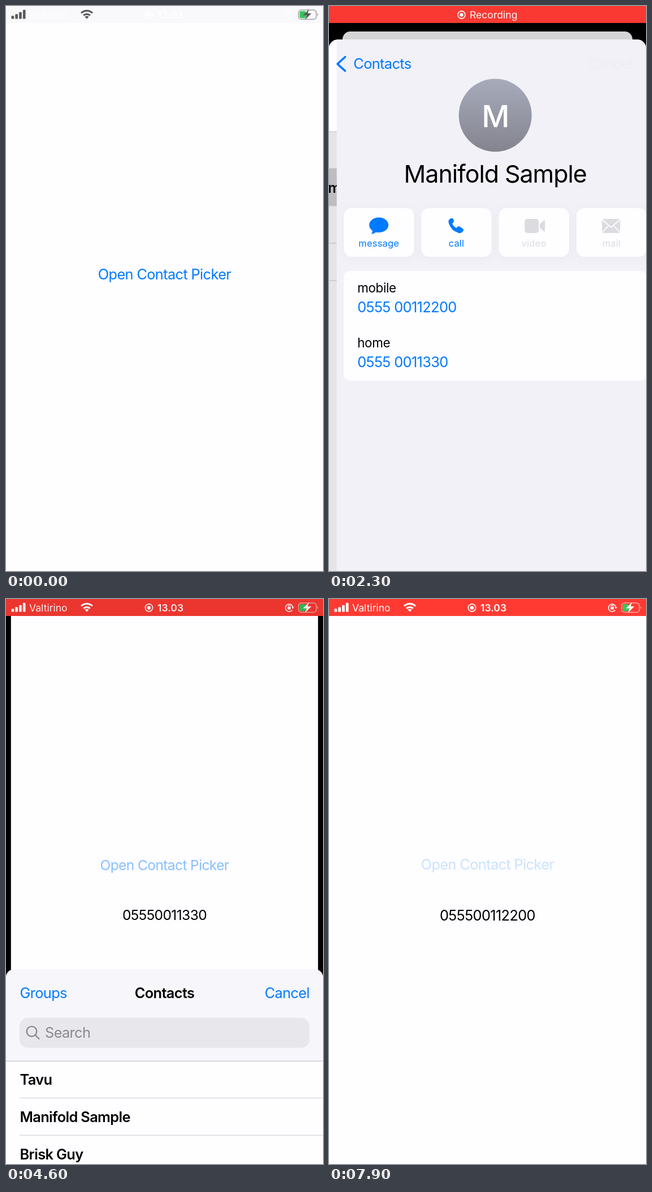
An HTML page for the animation above (8 s loop, 561 by 998 pixels).

```html
<!DOCTYPE html>
<html lang="en">
<head>
<meta charset="utf-8">
<title>Contact picker</title>
<style>
  html, body { margin: 0; width: 100%; height: 100%; overflow: hidden; background: #000; }
  svg { display: block; width: 100%; height: 100%; }
  text { font: 25.4px Inter, "Open Sans", sans-serif; letter-spacing: -.026em; white-space: pre; }
  .blue { fill: #007aff; }
  .off { fill: #dcdbe0; }
  .mid { text-anchor: middle; }
  .bold { font-weight: 600; }
  .grey { fill: #8a898e; }
  .italic { font-style: italic; }
  .bar text { font-size: 17.6px; letter-spacing: 0; fill: #fff; }
  text.small { font-size: 16.5px; letter-spacing: .01em; }
  text.kind { font-size: 22.4px; letter-spacing: -.015em; }
  text.name { font-size: 43px; letter-spacing: -.025em; }
  text.initial { font-size: 54px; font-weight: 500; fill: #fff; }
  #tiles rect { filter: drop-shadow(0 2px 8px rgba(0, 0, 0, .03)); }
</style>
</head>
<body>
<svg viewBox="0 0 561 998" preserveAspectRatio="none">
  <defs>
    <linearGradient id="shade" x2="0" y2="1">
      <stop stop-color="#a7abbb"/><stop offset="1" stop-color="#84848f"/>
    </linearGradient>
    <clipPath id="sheetClip"><rect y="59.6" width="561" height="1100" rx="15"/></clipPath>
    <clipPath id="cardClip"><rect x="12" y="468" width="537" height="194" rx="12"/></clipPath>
    <g id="record">
      <circle r="6.6" fill="none" stroke="#fff" stroke-width="1.7"/><circle r="3.3" fill="#fff"/>
    </g>
  </defs>

  <rect width="561" height="998"/>

  <g id="home">
    <rect id="homeBg" width="561" height="998" fill="#fefdff"/>
    <text id="open" class="blue mid" x="280.5">Open Contact Picker</text>
    <text id="picked" class="mid" x="280.5" y="568"></text>
    <rect id="homeDim" width="561" height="998"/>
  </g>

  <g id="sheet"><g clip-path="url(#sheetClip)">
    <rect y="59" width="561" height="1100" fill="#fefdff"/>
    <g id="list">
      <rect id="rowMark" y="287" width="800" height="66" fill="#d1d1d6"/>
      <g id="rows"></g>
    </g>
    <rect id="listDim" y="222" width="561" height="900"/>
    <rect y="59" width="561" height="163" fill="#fefdff"/>
    <rect id="headTint" y="59" width="561" height="163" fill="#f7f6fa"/>
    <rect y="221.3" width="561" height="1.5" fill="#cfced2"/>
    <g id="search">
      <rect x="24" y="145.5" width="513" height="53" rx="15" fill="#e8e7eb"/>
      <g fill="none" stroke="#85848a" stroke-width="2.2" stroke-linecap="round">
        <circle cx="45.5" cy="169.5" r="8.8"/><path d="M52 176l6.5 6.5"/>
      </g>
      <text class="grey" x="69" y="180.5">Search</text>
    </g>

    <g id="detail">
      <rect y="59" width="561" height="1100" fill="#f2f1f7"/>
      <g id="content">
        <circle cx="280.5" cy="193" r="64.5" fill="url(#shade)"/>
        <text class="initial mid" x="280.5" y="214">M</text>
        <text class="name mid" x="280.5" y="312">Manifold Sample</text>
        <g id="tiles"></g>
        <path class="blue" d="M74.5 373.5c9.5 0 17 6 17 13.3s-7.5 13.3-17 13.3q-3 0-5-.6q-3.5 3.2-8.5 3q2.5-2.5 2.3-5.5q-5.8-4-5.8-10.2c0-7.3 7.5-13.3 17-13.3z"/>
        <path class="blue" d="M202.5 375q-6 2-4.5 8q4 14 18 18q6 1 8.5-5q0-2-2-3l-5-3.5q-2-1-3.5 .5l-2.5 2q-5-2.5-7-7.5l2-2.5q1.5-2 .5-4q-1.5-4-4.5-3z"/>
        <g class="off">
          <rect x="332.5" y="376" width="25" height="25" rx="5"/>
          <path d="M359.5 385l7-6q2-1 2 1v17q0 2-2 1l-7-6z"/>
          <rect x="469.5" y="376" width="32" height="25" rx="2.5"/>
          <path d="M469.5 377l16 14l16-14M469.5 400l11.5-12M501.5 400l-11.5-12" fill="none" stroke="#fefdff" stroke-width="1.8"/>
        </g>
        <g clip-path="url(#cardClip)">
          <rect x="12" y="468" width="537" height="194" fill="#fefdff"/>
          <rect id="cellMark" x="12" width="537" height="97" fill="#d2d1d6"/>
        </g>
        <g id="numbers"></g>
      </g>
    </g>

    <g id="nav">
      <g id="listNav">
        <text class="blue" x="24.5" y="111">Groups</text>
        <text class="blue" x="537" y="111" text-anchor="end">Cancel</text>
        <text id="title" class="bold mid" y="111">Contacts</text>
      </g>
      <g id="backNav">
        <path d="M28.5 90l-13.5 12.3l13.5 12.3" fill="none" stroke="#007aff" stroke-width="3.6" stroke-linecap="round" stroke-linejoin="round"/>
        <text id="back" class="blue mid" y="111">Contacts</text>
      </g>
    </g>
  </g></g>

  <g class="bar">
    <rect width="561" height="30" fill="#f9f8fa"/>
    <rect id="red" width="561" height="30" fill="#ff3a33"/>
    <g id="status">
      <g id="icons" fill="currentColor">
        <g id="signal"></g>
        <path d="M143 22.8l-3.6-3.7a5.2 5.2 0 0 1 7.2 0z"/>
        <path d="M137.2 16.7a8.3 8.3 0 0 1 11.6 0M133 12.5a14 14 0 0 1 20 0" fill="none" stroke="currentColor" stroke-width="3.2"/>
        <rect x="517.7" y="7" width="31.5" height="16.5" rx="5" fill="none" stroke="currentColor" stroke-opacity=".55" stroke-width="1.5"/>
        <path d="M551 12.5q2.6 2.7 0 5.5z" fill-opacity=".6"/>
        <rect x="519.7" y="9" width="11" height="12.5" rx="3" fill="#34c759"/>
        <path d="M536.5 5.5l-11 11h6.5l-3 8l11.5-11.5h-6.7z"/>
      </g>
      <text x="41" y="21.7">Valtirino</text>
      <use href="#record" x="253" y="15.5"/>
      <text class="bold" x="268" y="21.8">13.03</text>
      <g fill="none" stroke="#fff" stroke-width="1.6">
        <path d="M506.5 19.5a6.6 6.6 0 1 1 1.2-4.5"/>
        <path d="M499.3 14.5v-1.5a1.8 1.8 0 0 1 3.6 0v1.5" stroke-width="1.2"/>
        <path d="M505.3 14.5h4.6l-2.3 3z" fill="#fff" stroke="none"/>
        <rect x="498.3" y="14" width="5.6" height="4.6" rx="1" fill="#fff" stroke="none"/>
      </g>
    </g>
    <g id="recording">
      <use href="#record" x="234.5" y="15.5"/>
      <text x="249" y="21.8">Recording</text>
    </g>
    <rect id="barDim" width="561" height="30"/>
  </g>
</svg>
<script>
const LOOP = 8000, STEP = 100, W = 561, TRAVEL = 938;
const NUMBERS = ["0555 00112200", "0555 0011330"];
const SESSIONS = [
  { open: 750, row: 1900, push: 1994, cell: 3200, close: 3380, pick: 1 },
  { open: 4530, row: 5200, push: 5279, cell: 6000, close: 6178, pick: 0 }
];
const PRESSES = [600, 4400, 7800];

const el = {};
document.querySelectorAll("[id]").forEach(n => el[n.id] = n);

const clamp = v => Math.max(0, Math.min(1, v));
const ramp = (t, from, length) => clamp((t - from) / length);
// Critically damped spring, 0 to 1
const spring = ms => {
  const x = Math.max(0, ms) * 0.0183;
  return 1 - (1 + x) * Math.exp(-x);
};
const put = (node, name, v) => node.setAttribute(name, v);
const move = (node, x, y = 0) => put(node, "transform", `translate(${x} ${y})`);
const fade = (node, a) => put(node, "opacity", a);
const show = (node, on) => put(node, "visibility", on ? "inherit" : "hidden");

function build() {
  const names = ["Tavu", "Manifold Sample", "Brisk Guy", "No Name"];
  el.rows.innerHTML = names.map((name, i) =>
    `<text class="${i < 3 ? "bold" : "grey italic"}" x="24.5" y="${263.5 + 66 * i}">${name}</text>` +
    `<rect x="24" y="${286.3 + 65.9 * i}" width="700" height="1.5" fill="#dcdbdf"/>`).join("");

  el.tiles.innerHTML = ["message", "call", "video", "mail"].map((label, i) => {
    const x = 12.5 + 137.2 * i;
    return `<rect x="${x}" y="357" width="124.3" height="86" rx="14" fill="#fefdff"/>` +
      `<text class="small mid ${i < 2 ? "blue" : "off"}" x="${x + 62}" y="425">${label}</text>`;
  }).join("");

  el.numbers.innerHTML = ["mobile", "home"].map((kind, i) =>
    `<text class="kind" x="36.5" y="${506 + 97 * i}">${kind}</text>` +
    `<text class="blue" x="36.5" y="${541.4 + 97 * i}">${NUMBERS[i]}</text>`).join("");

  el.signal.innerHTML = [5.5, 8.5, 12, 16].map((h, i) =>
    `<rect x="${9.5 + 6.8 * i}" y="${22.7 - h}" width="4.7" height="${h}" rx="1.3"/>`).join("");
}

function drawHome(t, p) {
  const done = SESSIONS.filter(s => t >= s.close).pop();
  el.picked.textContent = done ? NUMBERS[done.pick].replace(" ", "") : "";
  put(el.open, "y", done ? 478 : 483);
  const press = PRESSES.filter(x => t >= x).pop();
  fade(el.open, press === undefined ? 1 : 0.2 + 0.8 * ramp(t, press + 100, 300));

  const k = 1 - 0.0856 * p;
  put(el.home, "transform", `translate(${W * (1 - k) / 2} ${45 * p}) scale(${k})`);
  put(el.homeBg, "rx", 15 * p);
  put(el.homeDim, "rx", 15 * p);
  fade(el.homeDim, 0.165 * p ** 7);
}

function drawSheet(t, s, p) {
  show(el.sheet, p > 0);
  if (!p) return;
  const closing = t >= s.close;
  const left = 1 - spring(t - s.push);
  // Bar items settle a little sooner than the page
  const lag = clamp(left * 1.22 - 0.02);

  move(el.sheet, 0, TRAVEL * (1 - p));
  move(el.list, -0.3 * W * (1 - left));
  show(el.rowMark, t >= s.row);
  fade(el.listDim, 0.1 * (1 - left));
  fade(el.headTint, left);
  move(el.search, -W * (1 - lag));
  fade(el.search, left);

  move(el.detail, W * left);
  show(el.detail, left < 1);
  move(el.content, 0, closing ? 12 : 0);
  el.tiles.querySelectorAll("text").forEach(n => fade(n, clamp(1.02 - lag * 1.4)));
  show(el.cellMark, t >= s.cell);
  put(el.cellMark, "y", 468 + 97 * s.pick);

  move(el.nav, 0, closing ? 29.5 : 0);
  const cx = 92.5 + 188 * lag;
  put(el.title, "x", cx);
  put(el.back, "x", cx);
  fade(el.listNav, left);
  fade(el.backNav, 1 - lag);
}

function drawBar(t, s, p) {
  const rec = ramp(t, 400, 200) * (1 - ramp(t, 2900, 200));
  const shade = Math.round(90 + 165 * ramp(t, 0, 300));
  fade(el.red, ramp(t, 0, 400));
  fade(el.status, 1 - rec);
  fade(el.recording, rec);
  el.icons.style.color = `rgb(${shade},${shade},${shade})`;
  fade(el.barDim, s ? 0.24 * p * Math.exp((s.open - t) / 650) : 0);
}

function render(t) {
  const s = SESSIONS.filter(x => t >= x.open).pop();
  let p = s ? spring(t - s.open) : 0;
  if (s && t >= s.close) p = 1 - spring(t - s.close);
  if (p < 0.003) p = 0;
  drawHome(t, p);
  drawSheet(t, s, p);
  drawBar(t, s, p);
}

build();
render(0);
const start = performance.now();
function tick() {
  const t = (performance.now() - start) % LOOP;
  render(Math.floor(t / STEP) * STEP);
  requestAnimationFrame(tick);
}
requestAnimationFrame(tick);
</script>
</body>
</html>
```
